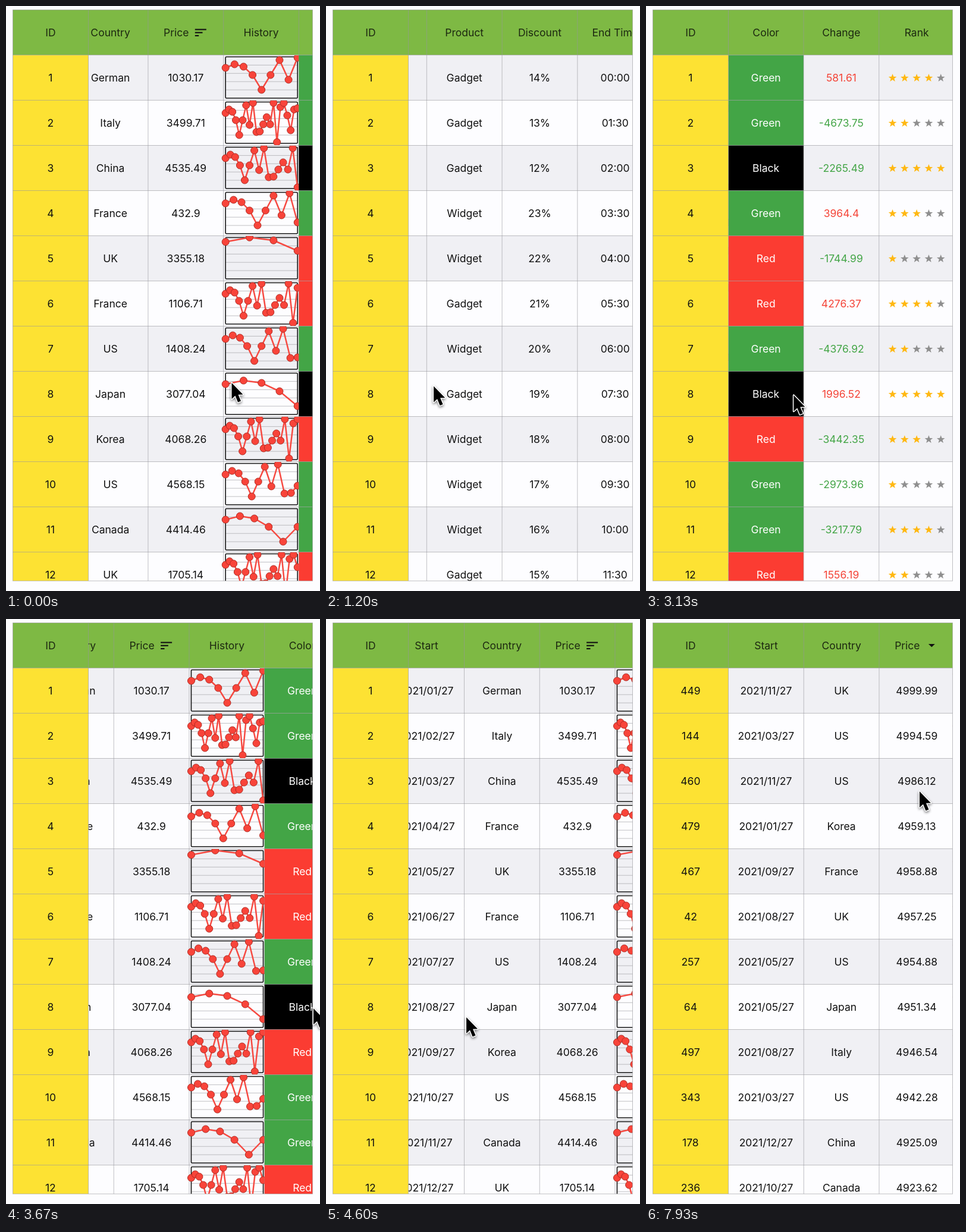
These frames come from a looping animation (528 px wide and 984 px high, 8000 ms). An HTML page with a canvas:

```html
<!DOCTYPE html>
<html lang="en">
<head>
<meta charset="utf-8">
<title>Scrolling data grid</title>
<style>
  html, body { margin: 0; width: 100%; height: 100%; overflow: hidden; background: #fdfdff; }
  canvas { display: block; width: 528px; height: 984px; }
</style>
</head>
<body>
<canvas id="stage"></canvas>
<script>
const W = 528, H = 984, LOOP = 8000;
const LEFT = 11.5, TOP = 6.5, RIGHT = 515.5, BOTTOM = 967;
const COL = 126.75, ROW = 76, BODY = 82.5, FROZEN = 138.5, VISIBLE = 12;
const GREEN = '#43a546', RED = '#fb3c32', INK = '#111', GREY = '#8f8f8f';
const LINE = 'rgba(150,150,155,.6)';

const canvas = document.getElementById('stage');
const ctx = canvas.getContext('2d');
const dpr = window.devicePixelRatio || 1;
canvas.width = W * dpr;
canvas.height = H * dpr;

// Data: the opening rows are labelled, the rest of the 500 are seeded
const countries = 'German Italy China France UK France US Japan Korea US Canada UK'.split(' ');
const prices = [1030.17, 3499.71, 4535.49, 432.9, 3355.18, 1106.71, 1408.24, 3077.04, 4068.26, 4568.15, 4414.46, 1705.14];
const changes = [581.61, -4673.75, -2265.49, 3964.4, -1744.99, 4276.37, -4376.92, 1996.52, -3442.35, -2973.96, -3217.79, 1556.19];
const history = [21, 15, 19, 33, 58, 33, 8, 41, 4, 53, 52, 40, 28, 40, 4, 70, 11, 4, 25, 50, 15, 13];
const paints = { G: ['Green', GREEN], B: ['Black', '#000'], R: ['Red', RED] };
const pad = n => String(n).padStart(2, '0');

let seed = 27;
function random() {
  seed = (seed * 16807) % 2147483647;
  return seed / 2147483647;
}
const money = () => Math.round(random() * 500000) / 100;

const initial = Array.from({ length: 500 }, (_, i) => {
  const n = i % VISIBLE, known = i < VISIBLE;
  return {
    id: i + 1,
    start: `2021/${pad(known ? i + 1 : Math.ceil(random() * 12))}/27`,
    country: known ? countries[i] : countries[Math.floor(random() * VISIBLE)],
    price: known ? prices[i] : money(),
    change: changes[n],
    color: paints['GGBGRRGBRGGR'[n]],
    product: 'GGGWWGWGWWWG'[n] === 'G' ? 'Gadget' : 'Widget',
    rank: 1 + (3 + 3 * n) % 5,
    active: n % 4 === 0,
    discount: 12 + (2 + 11 * n) % 12 + '%',
    end: `${pad(n)}:${n % 2 ? '30' : '00'}`,
    count: 4 + (5 + 13 * n) % 19
  };
});
const ascending = [...initial].sort((a, b) => a.price - b.price);
const descending = [...ascending].reverse();

// Motion: [time, value...]
const scrollKeys = [[0, 152], [400, 583], [1450, 1018], [2200, 1018], [3670, 211], [5100, 0]];
const cursorKeys = [[0, 380, 634], [400, 174, 647], [740, 400, 640], [1050, 180, 640], [2200, 237, 627],
  [2550, 505, 640], [3200, 240, 655], [3670, 517, 655], [4600, 236, 670], [5900, 457, 46], [7000, 457, 46], [7700, 460, 290]];
const presses = [70, 780, 2170, 3330, 5950, 6850], HOLD = 270;
const SORT_UP = 6100, SORT_DOWN = 7000;

// Monotone cubic interpolation
function curve(keys, t, c = 1) {
  let i = 0;
  while (i < keys.length - 2 && t > keys[i + 1][0]) i++;
  const slope = k => k < 0 || k > keys.length - 2 ? 0
    : (keys[k + 1][c] - keys[k][c]) / (keys[k + 1][0] - keys[k][0]);
  const tangent = k => {
    if (k === 0) return slope(0);
    const a = slope(k - 1), b = slope(k);
    return a * b > 0 ? 2 * a * b / (a + b) : 0;
  };
  const d = keys[i + 1][0] - keys[i][0];
  const u = Math.min(1, (t - keys[i][0]) / d), v = 1 - u;
  return keys[i][c] * (1 + 2 * u) * v * v + tangent(i) * d * u * v * v
    + keys[i + 1][c] * u * u * (3 - 2 * u) - tangent(i + 1) * d * u * u * v;
}

// Drawing helpers
function rect(x, y, w, h, fill) {
  ctx.fillStyle = fill;
  ctx.fillRect(x, y, w, h);
}

function path(points, stroke, width) {
  ctx.strokeStyle = stroke;
  ctx.lineWidth = width;
  ctx.beginPath();
  points.forEach(([x, y]) => ctx.lineTo(x, y));
  ctx.stroke();
}

const line = (x1, y1, x2, y2) => path([[x1, y1], [x2, y2]], LINE, 1);

function poly(points, fill) {
  ctx.beginPath();
  points.forEach(([x, y]) => ctx.lineTo(x, y));
  ctx.closePath();
  ctx.fillStyle = fill;
  ctx.fill();
}

function label(text, x, midY, fill = INK) {
  ctx.fillStyle = fill;
  ctx.fillText(text, x, midY + 6);
}

function clipped(x, y, w, h, draw) {
  ctx.save();
  ctx.beginPath();
  ctx.rect(x, y, w, h);
  ctx.clip();
  draw();
  ctx.restore();
}

function chart(row, x, y) {
  const x0 = x + 3.5, x1 = x + COL - 2.2, y0 = y + 3, h = 69.5;
  for (let k = 1; k < 5; k++) line(x0, y0 + k * h / 5, x1, y0 + k * h / 5);
  ctx.strokeStyle = '#151515';
  ctx.lineWidth = 1.6;
  ctx.beginPath();
  ctx.roundRect(x0, y0, x1 - x0, h, 1.5);
  ctx.stroke();

  // Short histories fill the height, so their values are stretched
  const shown = history.slice(0, row.count);
  const low = Math.max(...shown);
  const points = shown.map((v, i) => [
    x0 + i * (x1 - x0) / (row.count - 1),
    y + (low < 40 ? v * 1.25 - 16 : v + .5)
  ]);
  clipped(0, y + .5, W, ROW - 1, () => {
    path(points, '#f64a42', 2.5);
    ctx.fillStyle = '#f8443a';
    ctx.strokeStyle = '#b02c24';
    ctx.lineWidth = 1;
    for (const [px, py] of points) {
      ctx.beginPath();
      ctx.arc(px, py, 6, 0, 7);
      ctx.fill();
      ctx.stroke();
    }
  });
}

function star(x, y, fill) {
  const points = [];
  for (let k = 0; k < 10; k++) {
    const r = k % 2 ? 3 : 7.2, a = k * Math.PI / 5 - Math.PI / 2;
    points.push([x + r * Math.cos(a), y + .6 + r * Math.sin(a)]);
  }
  poly(points, fill);
}

function checkbox(x, y, on) {
  ctx.beginPath();
  ctx.roundRect(x - 10, y - 10, 20, 20, 2);
  ctx.fillStyle = ctx.strokeStyle = GREY;
  ctx.lineWidth = 2.4;
  ctx.stroke();
  if (!on) return;
  ctx.fill();
  path([[x - 7.5, y], [x - 2.5, y + 5], [x + 8, y - 5.5]], '#fff', 2.4);
}

const text = key => (row, x, y) => label(row[key], x + COL / 2, y + ROW / 2);

const columns = [
  ['Start', text('start')],
  ['Country', text('country')],
  ['Price', text('price')],
  ['History', chart],
  ['Color', (row, x, y) => {
    rect(x, y, COL, ROW, row.color[1]);
    label(row.color[0], x + COL / 2, y + ROW / 2, '#fff');
  }],
  ['Change', (row, x, y) => label(row.change, x + COL / 2, y + ROW / 2, row.change > 0 ? '#f44336' : GREEN)],
  ['Rank', (row, x, y) => {
    for (let k = 0; k < 5; k++)
      star(x + COL / 2 + (k - 2) * 20.3, y + ROW / 2, k < row.rank ? '#ffb812' : GREY);
  }],
  ['Active', (row, x, y) => checkbox(x + COL / 2, y + ROW / 2, row.active)],
  ['Product', text('product')],
  ['Discount', text('discount')],
  ['End Time', text('end')]
];

function sortIcon(x, y, sort) {
  if (sort === 0) {
    for (let k = 0; k < 3; k++) rect(x - 9.5, y - 6 + k * 5.2, 19 - k * 6.3, 2.1, INK);
  } else {
    poly([[x - 5.5, y + 2.5 * sort], [x + 5.5, y + 2.5 * sort], [x, y - 2.8 * sort]], INK);
  }
}

function header(name, x, sort) {
  const mid = x + COL / 2, y = 44.5, ink = '#1c2810';
  if (name !== 'Price') return label(name, mid, y, ink);
  label(name, mid - 16, y, ink);
  sortIcon(mid + 25, y, sort);
}

function grid(rows, scroll, sort) {
  rect(LEFT, TOP, RIGHT - LEFT, BODY - TOP, '#7eb944');
  rows.forEach((row, i) => {
    rect(FROZEN, BODY + i * ROW, RIGHT - FROZEN, ROW, i % 2 ? '#fdfdff' : '#f0f0f4');
  });

  clipped(FROZEN, TOP, RIGHT - FROZEN, BOTTOM - TOP, () => {
    columns.forEach(([name, cell], c) => {
      const x = FROZEN + c * COL - scroll;
      if (x > RIGHT + 8 || x + COL < FROZEN - 8) return;
      header(name, x, sort);
      rows.forEach((row, i) => cell(row, x, BODY + i * ROW));
      line(x + COL, TOP, x + COL, BOTTOM);
    });
  });

  rect(LEFT, BODY, FROZEN - LEFT, BOTTOM - BODY, '#fde233');
  header('ID', LEFT, sort);
  rows.forEach((row, i) => {
    const y = BODY + i * ROW;
    label(row.id, LEFT + COL / 2, y + ROW / 2);
    line(LEFT, y, RIGHT, y);
  });
  line(FROZEN, TOP, FROZEN, BOTTOM);
}

function pointer(x, y, pressed) {
  if (pressed) {
    ctx.strokeStyle = '#000';
    ctx.lineWidth = 3;
    ctx.beginPath();
    ctx.arc(x - 1, y + 1, 43, 0, 7);
    ctx.stroke();
  }
  ctx.save();
  ctx.translate(x, y);
  if (pressed) ctx.scale(.88, .88);
  ctx.shadowColor = 'rgba(0,0,0,.4)';
  ctx.shadowBlur = 4 * dpr;
  ctx.shadowOffsetY = 2 * dpr;
  const arrow = [[0, 0], [0, 27], [6, 21.5], [10.5, 32.5], [15.5, 30.5], [11, 19.8], [19, 19.5]];
  poly(arrow, '#fff');
  ctx.strokeStyle = '#fff';
  ctx.lineWidth = 3;
  ctx.lineJoin = 'round';
  ctx.stroke();
  ctx.shadowColor = 'transparent';
  poly(arrow, '#000');
  ctx.restore();
}

function render(t) {
  ctx.setTransform(dpr, 0, 0, dpr, 0, 0);
  ctx.font = '17.5px Inter, Roboto, sans-serif';
  ctx.textAlign = 'center';
  rect(0, 0, W, H, '#fdfdff');
  const sort = t < SORT_UP ? 0 : t < SORT_DOWN ? 1 : -1;
  const rows = (sort === 0 ? initial : sort > 0 ? ascending : descending).slice(0, VISIBLE);
  clipped(0, 0, W, BOTTOM, () => grid(rows, curve(scrollKeys, t), sort));
  ctx.strokeStyle = LINE;
  ctx.lineWidth = 1;
  ctx.strokeRect(LEFT, TOP, RIGHT - LEFT, BOTTOM - TOP);
  pointer(curve(cursorKeys, t), curve(cursorKeys, t, 2), presses.some(p => t >= p && t < p + HOLD));
}

const began = performance.now();
function tick() {
  render((performance.now() - began) % LOOP);
  requestAnimationFrame(tick);
}
tick();
</script>
</body>
</html>
```
